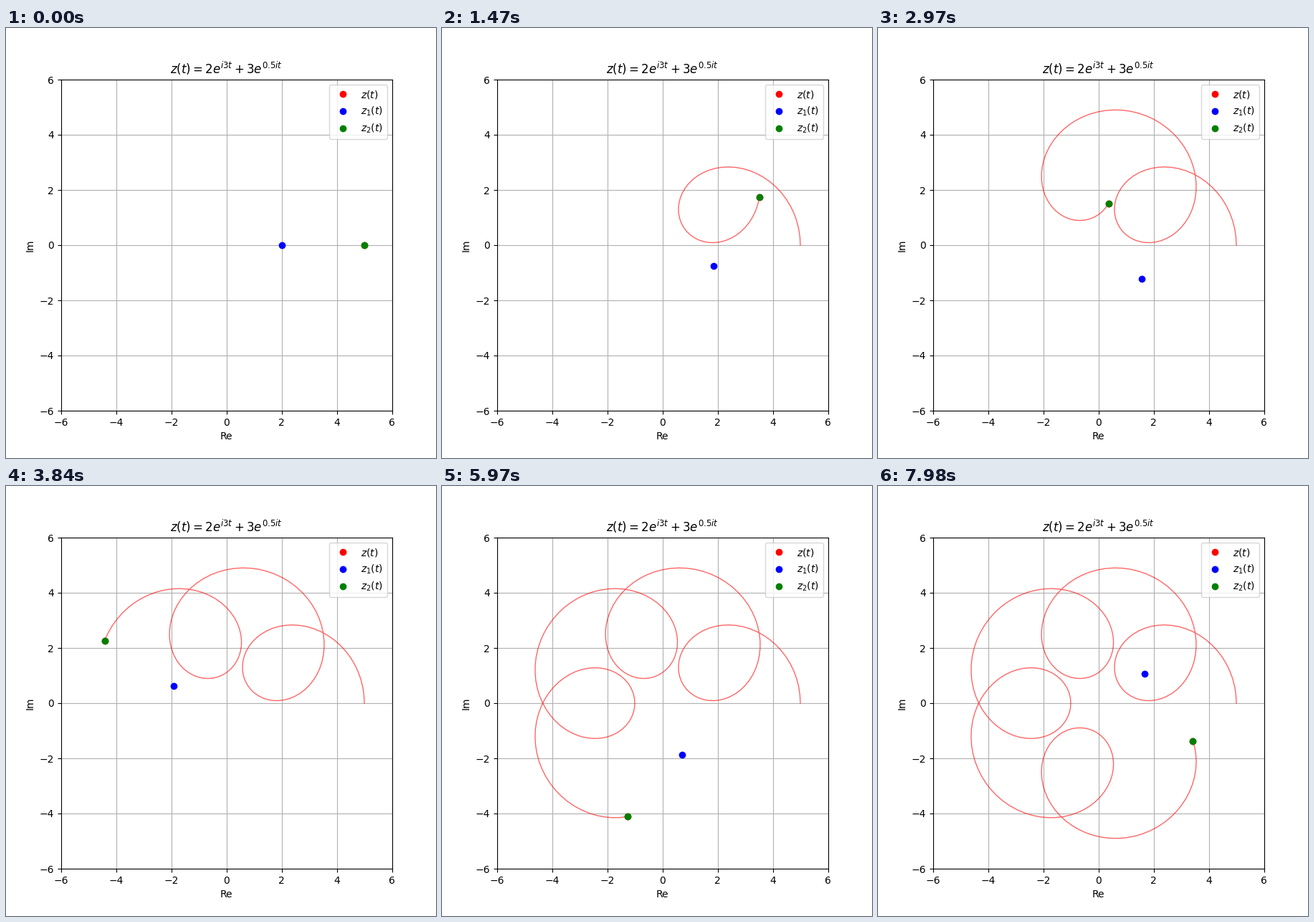
These frames come from a looping animation (600 px wide and 600 px high, 8 s). A matplotlib script:

```python
import numpy as np
import matplotlib.pyplot as plt
from matplotlib.animation import FuncAnimation

LOOP_MS = 8000
FRAMES = 267

t = np.linspace(0, 20, 500)
z1 = 2 * np.exp(3j * t)
z = z1 + 3 * np.exp(0.5j * t)

fig, ax = plt.subplots(figsize=(6, 6), dpi=100)
ax.set_xlim(-6, 6)
ax.set_ylim(-6, 6)
ax.set_aspect("equal")
ax.grid(True)
ax.set_xlabel("Re")
ax.set_ylabel("Im")
ax.set_title(r"$z(t) = 2e^{i3t} + 3e^{0.5it}$")

trail, = ax.plot([], [], "r-", lw=1, alpha=0.6)
dot_z, = ax.plot([], [], "ro", label=r"$z(t)$")
dot_z1, = ax.plot([], [], "bo", label=r"$z_1(t)$")
dot_z2, = ax.plot([], [], "go", label=r"$z_2(t)$")
ax.legend(loc="upper right")


def place(artist, points):
    artist.set_data(points.real, points.imag)


def update(i):
    now = slice(i, i + 1)
    place(trail, z[:i + 1])
    place(dot_z, z[now])
    place(dot_z1, z1[now])
    place(dot_z2, z[now])  # second arm starts at the tip of the first
    return trail, dot_z, dot_z1, dot_z2


anim = FuncAnimation(fig, update, frames=FRAMES, interval=LOOP_MS / FRAMES,
                     init_func=lambda: update(0), blit=True,
                     repeat=True, repeat_delay=0)

plt.show()
```
